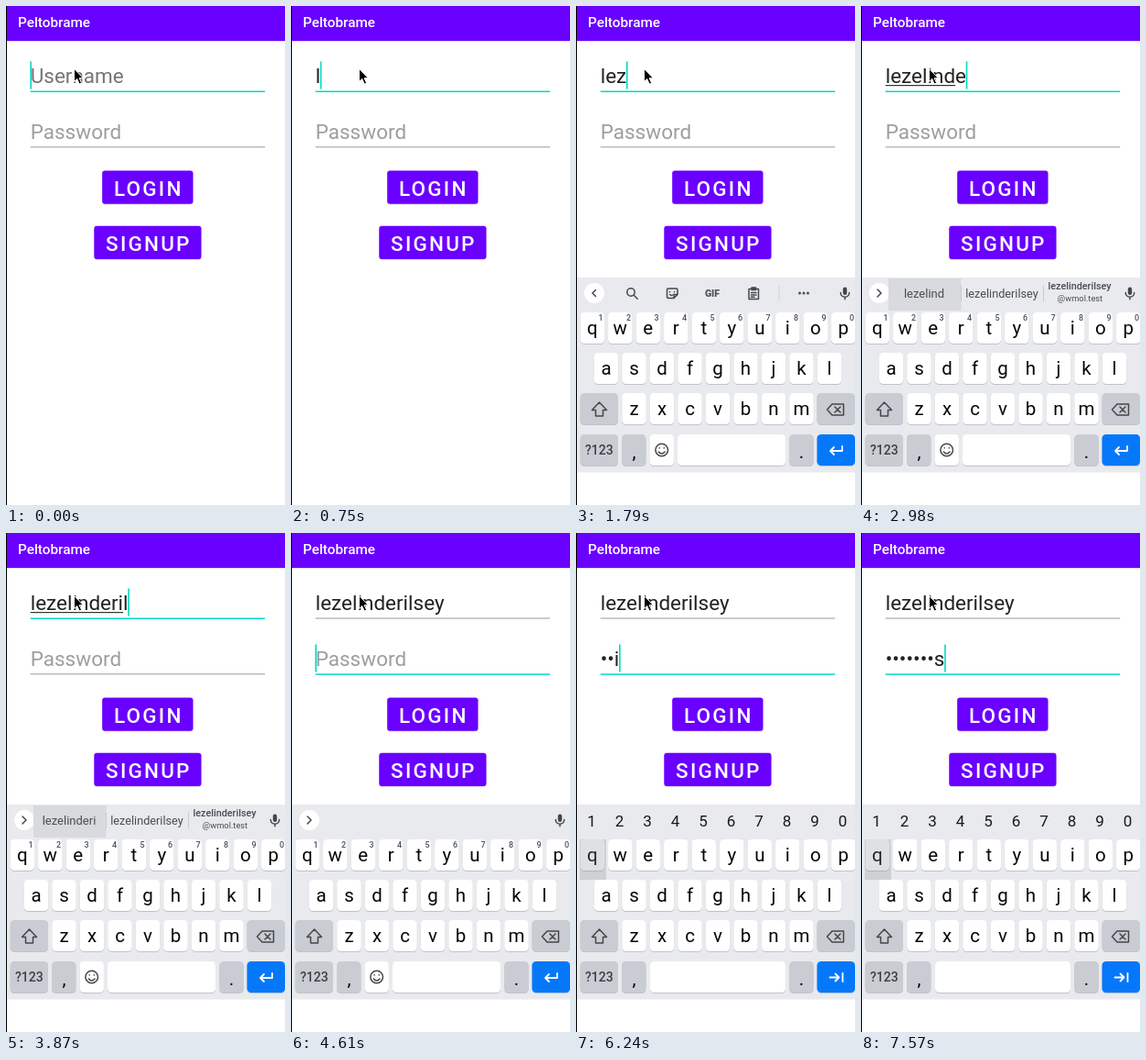
An HTML page for the animation above (8 s loop, 305 by 544 pixels).

```html
<!DOCTYPE html>
<html lang="en">
<head>
<meta charset="utf-8">
<title>Login form</title>
<style>
  html, body { margin: 0; width: 100%; height: 100%; overflow: hidden; background: #fff; }
  svg { display: block; width: 100%; height: 100%; font-family: Roboto, sans-serif; }
  text { white-space: pre; }
  .field { font-size: 22.5px; fill: #222; }
  .label { font-size: 22.5px; font-weight: 500; letter-spacing: 2.2px; fill: #fff; }
  .key { font-size: 20.5px; fill: #060606; text-anchor: middle; }
  .digit { font-size: 17px; fill: #17181a; text-anchor: middle; }
  .tiny { font-size: 9px; font-weight: 500; fill: #4c5056; text-anchor: middle; }
  .tip { font-size: 13px; fill: #4a4d52; text-anchor: middle; }
  .icon { fill: none; stroke: #43474c; stroke-width: 1.5; stroke-linecap: round; stroke-linejoin: round; }
</style>
</head>
<body>
<svg id="stage" viewBox="0 0 305 544"></svg>
<script>
const NS = 'http://www.w3.org/2000/svg';
const stage = document.getElementById('stage');
const LOOP = 8000;
const USER = 'lezelinderilsey';
const SECRET = 'koilutes';
const TEAL = '#03dac5', PURPLE = '#6a00ff', GREY = '#9b9b9b';
const LEFT = 26.7, USER_Y = 84.4, SECRET_Y = 145.2;

const userTimes = [750, 1490, 1640, 2080, 2380, 2530, 2680, 2830, 2980, 3580, 3720, 3870, 4020, 4160, 4310];
const secretTimes = [5800, 6100, 6240, 6540, 6680, 6980, 7270, 7570];
const caretOff = [[600, 750], [1930, 2080], [3430, 3580], [5050, 5650]];

function add(parent, tag, attrs, content) {
  const el = document.createElementNS(NS, tag);
  for (const k in attrs) el.setAttribute(k, attrs[k]);
  if (content !== undefined) el.textContent = content;
  return parent.appendChild(el);
}
const group = parent => add(parent, 'g', {});
const rect = (p, x, y, width, height, fill, rx = 0) => add(p, 'rect', { x, y, width, height, fill, rx });
const text = (p, cls, x, y, s) => add(p, 'text', { class: cls, x, y }, s);
const icon = (p, d, extra) => add(p, 'path', { class: 'icon', d, ...extra });
const set = (el, attrs) => { for (const k in attrs) el.setAttribute(k, attrs[k]); };
const show = (el, on) => el.setAttribute('visibility', on ? 'visible' : 'hidden');

function key(p, x, y, w, fill = '#fff') {
  rect(p, x, y + 1, w, 34, '#c0c3c8', 4.5);
  rect(p, x, y, w, 34, fill, 4.5);
}

// Page
rect(stage, 0, 0, 305, 544, '#fff');
rect(stage, 0, 0, 1, 544, '#000');
rect(stage, 1, 38, 304, 1, '#e4e2e8');
rect(stage, 1, 0, 304, 38, PURPLE);
add(stage, 'text', { x: 13, y: 23, 'font-size': 15.3, 'font-weight': 500, fill: '#fff' }, 'Peltobrame');

const userHint = text(stage, 'field', LEFT, USER_Y, 'Username');
const userText = text(stage, 'field', LEFT, USER_Y, '');
const userLine = rect(stage, LEFT, 92.5, 256.5, 1.5, TEAL);
const compose = rect(stage, LEFT, 86, 0, 1.2, '#333');
const secretHint = text(stage, 'field', LEFT, SECRET_Y, 'Password');
secretHint.style.fill = '#9e9e9e';
const secretText = text(stage, 'field', LEFT, SECRET_Y, '');
const secretLine = rect(stage, LEFT, 153.3, 256.5, 1, GREY);
const caret = rect(stage, LEFT, 60.5, 1.6, 30, TEAL);

function button(x, y, w, label, tx) {
  rect(stage, x, y + .6, w, 36.3, '#ddd5ea', 3);
  rect(stage, x, y, w, 36.3, PURPLE, 3);
  text(stage, 'label', tx, y + 27, label);
}
button(105.2, 179.5, 99.3, 'LOGIN', 117.9);
button(96.3, 239.8, 117.2, 'SIGNUP', 109.1);

const bar = rect(stage, 1, 508, 304, 36, '#000');

// Keyboard
const board = group(stage);
rect(board, 1, 296, 304, 212.5, '#e8eaed');
const PITCH = 30.5, DARK = '#c9ccd2';

function keyRow(letters, cx, y) {
  [...letters].forEach((c, i) => {
    const x = cx + i * PITCH;
    key(board, x - 13.2, y, 26.4);
    text(board, 'key', x, y + 24, c);
  });
}
keyRow('qwertyuiop', 17.8, 334);
keyRow('asdfghjkl', 33, 378);
keyRow('zxcvbnm', 63.5, 422);
key(board, 4.6, 422, 41.4, DARK);
key(board, 263.5, 422, 41.5, DARK);
icon(board, 'M25.5 432l-8 8.5h4v6.5h8v-6.5h4z');
icon(board, 'M280 434h12.5v12H280l-5.5-6zM283 437l6 6m0-6l-6 6');
key(board, 4.6, 467, 41.4, DARK);
add(board, 'text', { x: 25.3, y: 489, 'font-size': 14, 'font-weight': 500, fill: '#3c4043', 'text-anchor': 'middle' }, '?123');
key(board, 50, 467, 26.4, DARK);
text(board, 'key', 63.5, 493, ',');
key(board, 233.3, 467, 26.4, DARK);
text(board, 'key', 246.5, 493, '.');
key(board, 263.5, 467, 41.5, '#0578fa');

// Regular layout
const plain = group(board), secure = group(board);
[...'1234567890'].forEach((c, i) => {
  text(plain, 'tiny', 27 + i * PITCH, 343.3, c);
  text(secure, 'digit', 17 + i * PITCH, 320, c);
});
key(plain, 80.5, 467, 26.4);
key(plain, 111, 467, 118);
add(plain, 'circle', { class: 'icon', cx: 93.7, cy: 484, r: 6.8 });
icon(plain, 'M90.3 486q3.4 4.2 6.8 0M91.2 481.8v.3M96.2 481.8v.3');
icon(plain, 'M291 480v5h-13m4-4l-4 4 4 4', { style: 'stroke:#fff;stroke-width:1.8' });
add(plain, 'circle', { cx: 20, cy: 313, r: 11, fill: '#fff' });
const chevron = icon(plain, '');
rect(plain, 291.8, 306.5, 4.4, 8.5, '#43474c', 2.2);
icon(plain, 'M289.3 312.5c0 6.2 9.4 6.2 9.4 0M294 317.5v2.3');

// Toolbar
const tools = group(plain);
icon(tools, 'M63.2 315.2l4 4');
add(tools, 'circle', { class: 'icon', cx: 60, cy: 312, r: 4.2 });
icon(tools, 'M101 308h8.5q1.5 0 1.5 1.5v5l-4 4h-6q-1.5 0-1.5-1.5v-7.5q0-1.5 1.5-1.5M107 318v-3.5h4M102.5 311.5v.3M107.5 311.5v.3M102.5 314.5q1.5 1.5 3 .5');
add(tools, 'text', { x: 149, y: 316.8, 'font-size': 10.5, 'font-weight': 800, fill: '#4c5056', 'text-anchor': 'middle' }, 'GIF');
icon(tools, 'M189 308.5h10.5v11H189zM192 307h4.5v2.5H192zM191.5 312.5h5.5M191.5 315h5.5M191.5 317.3h3.5');
rect(tools, 221.5, 305, 1, 17, '#d0d3d7');
for (const x of [244.5, 249, 253.5]) add(tools, 'circle', { cx: x, cy: 313, r: 1.5, fill: '#4c5056' });

// Suggestions
const tips = group(plain);
rect(tips, 30, 297, 79.5, 35, '#d8dadd');
rect(tips, 109, 305, 1, 17, '#c8cbcf');
rect(tips, 199, 305, 1, 17, '#c8cbcf');
const firstTip = text(tips, 'tip', 69, 318, '');
text(tips, 'tip', 154, 318, USER).style.fontSize = '12.7px';
set(text(tips, 'tip', 239, 309, USER), { style: 'font-size:10.8px;font-weight:500' });
text(tips, 'tip', 239.5, 322, '@wmol.test').style.fontSize = '9.3px';

// Password layout
key(secure, 81, 467, 148);
icon(secure, 'M277.5 484.5h10m-4-4l4 4-4 4M291.5 480v9', { style: 'stroke:#fff;stroke-width:1.8' });
add(secure, 'rect', { x: 4, y: 334, width: 29, height: 44, fill: '#85888c', opacity: .26 });

// Mouse pointer
add(stage, 'path', {
  d: 'M74.5 68.5v14l3.2-3 2.5 5.5 2.4-1.1-2.5-5.2h4.3z',
  fill: '#000', stroke: '#fff', 'stroke-width': 1
});

const count = (times, t) => times.filter(x => x <= t).length;
const width = el => el.textContent ? el.getComputedTextLength() : 0;

function render(t) {
  const n = count(userTimes, t), m = count(secretTimes, t);
  const onSecret = t >= 4610, locked = t >= 4910;
  const hinting = t >= 2380 && !onSecret;
  const known = t >= 3130 && n === 9 ? 9 : n - 1;

  userText.textContent = USER.slice(0, n);
  secretText.textContent = m ? '•'.repeat(m - 1) + SECRET[m - 1] : '';
  show(userHint, !n);
  show(secretHint, !m);
  userHint.style.fill = t < 150 ? '#757575' : '#9e9e9e';

  set(userLine, { fill: onSecret ? GREY : TEAL, height: onSecret ? 1 : 1.5 });
  set(secretLine, { fill: onSecret ? TEAL : GREY, height: onSecret ? 1.5 : 1 });
  set(caret, { x: LEFT - .3 + width(onSecret ? secretText : userText), y: onSecret ? 121.5 : 60.5 });
  show(caret, !caretOff.some(([a, b]) => t >= a && t < b));
  compose.setAttribute('width', hinting ? userText.getSubStringLength(0, known) : 0);

  show(bar, t >= 890 && t < 1790);
  board.style.display = t >= 1790 ? '' : 'none';
  plain.style.display = locked ? 'none' : '';
  secure.style.display = locked ? '' : 'none';
  tools.style.display = t < 2380 ? '' : 'none';
  tips.style.display = hinting ? '' : 'none';
  firstTip.textContent = USER.slice(0, Math.max(known, 0));
  chevron.setAttribute('d', t < 2380 ? 'M21.5 309.5l-3.5 3.5 3.5 3.5' : 'M18 309l4 4-4 4');
}

let start;
function tick(now) {
  start ??= now;
  render((now - start) % LOOP);
  requestAnimationFrame(tick);
}
render(0);
requestAnimationFrame(tick);
</script>
</body>
</html>
```
